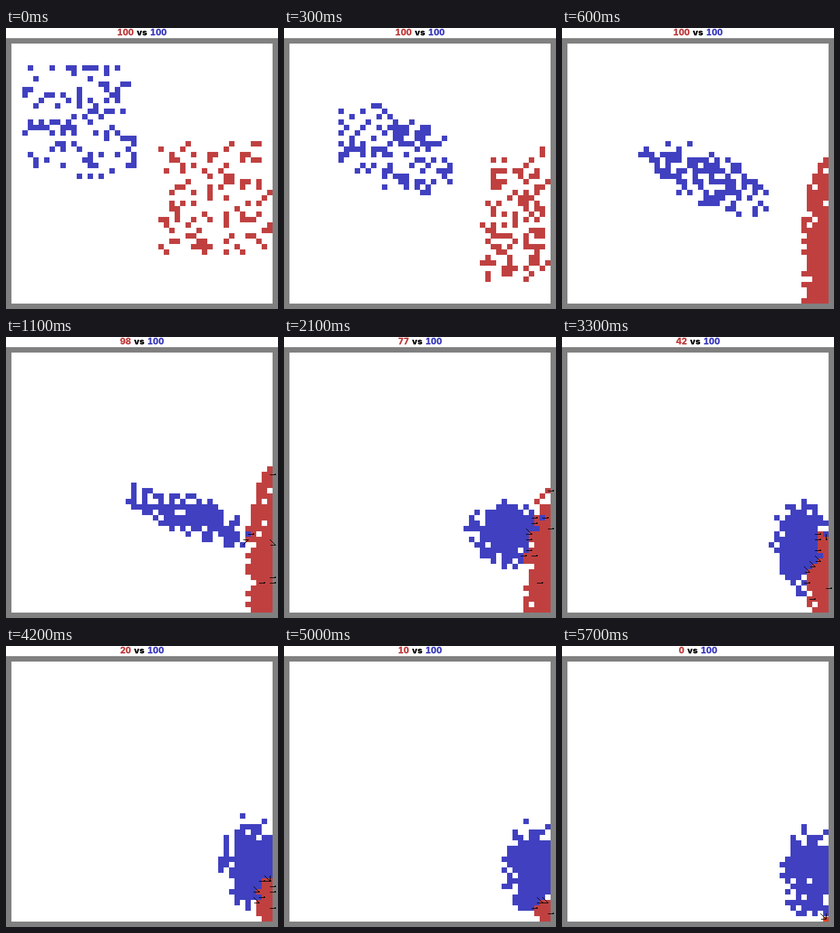
Recreate the animation shown at these times as an HTML page with a canvas. Size 400x415 px, loop 5800 ms.

```html
<!DOCTYPE html>
<html lang="en">
<head>
<meta charset="utf-8">
<title>Red vs blue</title>
<style>
  html, body { margin: 0; width: 100%; height: 100%; overflow: hidden; background: #fff; }
  canvas { position: absolute; left: 0; top: 0; }
  #score {
    position: absolute; left: 0; top: -1px; width: 400px; text-align: center;
    font: 900 12.6px/15px Inter, "Liberation Sans", sans-serif;
    font-variant-numeric: tabular-nums; word-spacing: 1px; white-space: pre;
  }
  #red { color: #c04040; }
  #blue { color: #4040c0; }
</style>
</head>
<body>
<canvas id="field" width="400" height="415"></canvas>
<div id="score"><span id="red">100</span> vs <span id="blue">100</span></div>
<script>
const SIZE = 48, CELL = 8, LEFT = 8, TOP = 23, EDGE = SIZE - 1;
const STEP_MS = 100, STEPS = 58, ARMY = 100;
const RED = '#c04040', BLUE = '#4040c0';

// Key moments: reds left, and the blue swarm as a slanted ellipse
const moments = [
  { step: 0, reds: 100 },
  { step: 6, reds: 100, swarm: { cx: 25, cy: 24, rx: 14, ry: 7, slope: 0.35 } },
  { step: 11, reds: 98, swarm: { cx: 33, cy: 30, rx: 14.5, ry: 5, slope: 0.35 } },
  { step: 21, reds: 77, swarm: { cx: 40, cy: 33, rx: 8.5, ry: 6.5, slope: 0.1 } },
  { step: 33, reds: 42, swarm: { cx: 43, cy: 36, rx: 6.5, ry: 9.5, slope: 0.2 } },
  { step: 42, reds: 20, swarm: { cx: 44, cy: 37, rx: 6.5, ry: 9.5, slope: 0.2 } },
  { step: 57, reds: 0, swarm: { cx: 45, cy: 39, rx: 7, ry: 10, slope: 0 } }
];

// Reds pile up against the right wall; the pile sinks to the corner as they fall
function pile(reds) {
  const n = reds / ARMY;
  return { cx: EDGE, cy: EDGE - 6 * n, rx: 2.5 + 2.5 * n, ry: 22 * n ** 0.6, slope: 0 };
}

function seeded(seed) {
  return () => {
    seed = (seed + 0x6d2b79f5) | 0;
    let v = Math.imul(seed ^ (seed >>> 15), 1 | seed);
    v = (v + Math.imul(v ^ (v >>> 7), 61 | v)) ^ v;
    return ((v ^ (v >>> 14)) >>> 0) / 4294967296;
  };
}
const rand = seeded(41);
const lerp = (a, b, t) => a + (b - a) * t;
const key = (x, y) => y * SIZE + x;
const inside = (x, y) => x >= 0 && y >= 0 && x < SIZE && y < SIZE;

const camp = (left, top, side = 21) => (x, y) =>
  x >= left && x < left + side && y >= top && y < top + side ? 0 : 1;
const ellipse = ({ cx, cy, rx, ry, slope }) => (x, y) => {
  const dx = x - cx, dy = y - cy - slope * dx;
  return ((dx / rx) ** 2 + (dy / ry) ** 2) ** 2;
};

// Takes the free cells closest to a shape, with a ragged edge
function scatter(count, distance, taken) {
  const cells = [];
  for (let y = 0; y < SIZE; y++) for (let x = 0; x < SIZE; x++) {
    if (!taken.has(key(x, y))) cells.push({ x, y, rank: distance(x, y) + rand() });
  }
  const picked = cells.sort((a, b) => a.rank - b.rank).slice(0, count);
  picked.forEach(c => taken.add(key(c.x, c.y)));
  return picked;
}

const mean = (list, axis) => list.reduce((sum, p) => sum + p[axis], 0) / (list.length || 1);
const spot = unit => unit.path[unit.path.length - 1];

// Links two formations by nearest place; units without a place fall one by one
function advance(units, goals, from, to) {
  const here = units.map(spot);
  const dx = mean(goals, 'x') - mean(here, 'x'), dy = mean(goals, 'y') - mean(here, 'y');
  const free = new Set(units);
  for (const g of goals) {
    let best, least = Infinity;
    for (const u of free) {
      const d = Math.hypot(spot(u).x + dx - g.x, spot(u).y + dy - g.y);
      if (d < least) { least = d; best = u; }
    }
    free.delete(best);
    best.path.push(g);
  }
  const lost = [...free].sort((a, b) => spot(a).y - spot(b).y);
  lost.forEach((u, i) => {
    u.end = lerp(from, to, (i + 1) / lost.length);
    u.path.push(spot(u));
  });
  return units.filter(u => !free.has(u));
}

const formations = moments.map(({ step, reds, swarm }) => {
  const taken = new Set();
  return {
    step,
    red: scatter(reds, swarm ? ellipse(pile(reds)) : camp(27, 18), taken),
    blue: scatter(ARMY, swarm ? ellipse(swarm) : camp(2, 4), taken)
  };
});

function army(side) {
  const all = formations[0][side].map(c => ({ path: [c], end: Infinity }));
  let alive = all;
  for (let i = 1; i < formations.length; i++) {
    alive = advance(alive, formations[i][side], formations[i - 1].step, formations[i].step);
  }
  return all;
}
const reds = army('red'), blues = army('blue');

// Rounds to the grid and moves to the closest free cell if needed
function settle(x, y, taken) {
  const cx = Math.round(x), cy = Math.round(y);
  for (let r = 0; r < SIZE; r++) {
    let best = null, least = Infinity;
    for (let j = cy - r; j <= cy + r; j++) for (let i = cx - r; i <= cx + r; i++) {
      if (!inside(i, j) || taken.has(key(i, j))) continue;
      const d = Math.hypot(i - x, j - y);
      if (d < least) { least = d; best = { x: i, y: j }; }
    }
    if (best) {
      taken.add(key(best.x, best.y));
      return best;
    }
  }
}

function place(units, step, taken) {
  let i = 0;
  while (i < formations.length - 2 && formations[i + 1].step <= step) i++;
  const from = formations[i].step, to = formations[i + 1].step;
  const t = (step - from) / (to - from);
  return units.filter(u => step < u.end).map(u => {
    const a = u.path[i], b = u.path[i + 1];
    return settle(lerp(a.x, b.x, t), lerp(a.y, b.y, t), taken);
  });
}

const ctx = document.getElementById('field').getContext('2d');
const redText = document.getElementById('red');
const box = (color, x, y, w, h) => { ctx.fillStyle = color; ctx.fillRect(x, y, w, h); };
const drawCell = (c, color) => box(color, LEFT + c.x * CELL, TOP + c.y * CELL, CELL, CELL);

function arrow(c, dx, dy) {
  const x = LEFT + c.x * CELL + 4, y = TOP + c.y * CELL + 4;
  for (let i = 0; i <= CELL; i++) box('#000', x + dx * i, y + dy * i, 1, 1);
  const tx = x + dx * CELL, ty = y + dy * CELL;
  if (dx && dy) box('#000', Math.min(tx, tx - dx * 7), ty, 8, 1);
  else box('#000', tx - (dx > 0), ty - 1, 2, 2);
}

const around = [[1, 0], [1, 1], [0, 1], [0, -1], [1, -1], [-1, 0]];

// Blues strike a touching red; a few reds lash out, mostly at the wall
function drawArrows(red, blue, step) {
  const luck = seeded(step * 977 + 8);
  const targets = new Set(red.map(c => key(c.x, c.y)));
  for (const c of blue) {
    const hit = around.find(([dx, dy]) =>
      inside(c.x + dx, c.y + dy) && targets.has(key(c.x + dx, c.y + dy)));
    if (hit && luck() < 0.65) arrow(c, ...hit);
  }
  for (const c of red) {
    const chance = c.x === EDGE ? 0.12 : 0.04;
    if (luck() < chance) arrow(c, 1, luck() < 0.15 ? 1 : 0);
  }
}

// The final blow lands in the corner
function drawFinish() {
  box('#e04020', 384, 400, 8, 7);
  arrow({ x: EDGE - 1, y: EDGE - 1 }, 1, 1);
  box('#000', 388, 395, 1, 8);
}

function draw(step) {
  const taken = new Set();
  const last = step === STEPS - 1;
  if (last) taken.add(key(EDGE, EDGE));
  const red = place(reds, step, taken);
  const blue = place(blues, step, taken);

  box('#fff', 0, 0, 400, 15);
  box('#808080', 0, 15, 400, 400);
  box('#fff', LEFT, TOP, SIZE * CELL, SIZE * CELL);
  red.forEach(c => drawCell(c, RED));
  blue.forEach(c => drawCell(c, BLUE));
  if (step > 6) drawArrows(red, blue, step);
  if (last) drawFinish();
  redText.textContent = red.length;
}

let shown = -1;
const start = performance.now();
function tick() {
  const step = Math.floor((performance.now() - start) / STEP_MS) % STEPS;
  if (step !== shown) draw(shown = step);
  requestAnimationFrame(tick);
}
tick();
</script>
</body>
</html>
```
